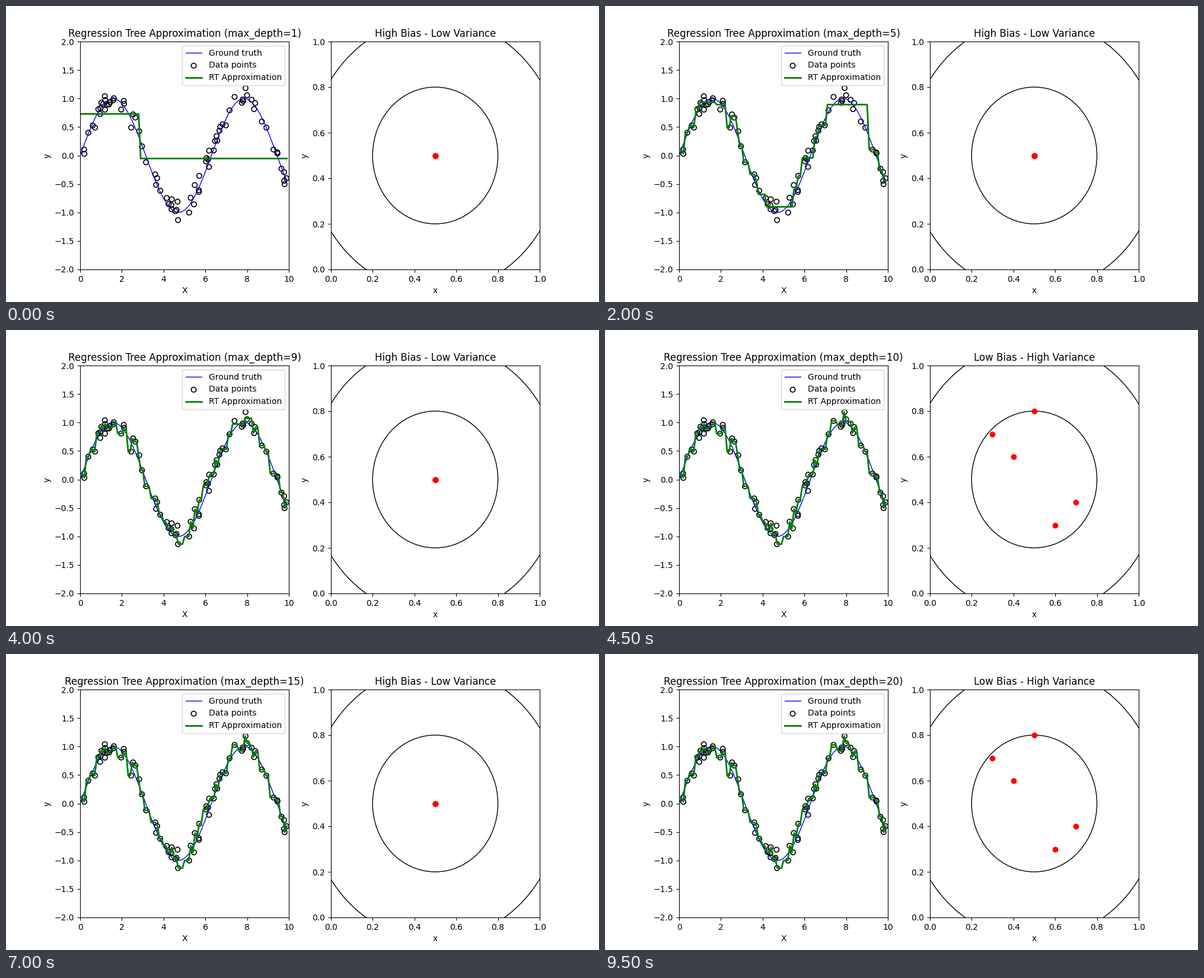
A matplotlib script that plays this animation: 1000 px wide and 500 px high, repeating every 10 s.

```python
import numpy as np
import matplotlib.pyplot as plt
from matplotlib.animation import FuncAnimation

MAX_DEPTH = 20
FRAME_MS = 500
CENTER = np.full((5, 2), 0.5)
SPREAD = np.array([(0.3, 0.7), (0.4, 0.6), (0.5, 0.8), (0.6, 0.3), (0.7, 0.4)])

np.random.seed(0)
X = np.sort(10 * np.random.rand(80))
y = np.sin(X) + np.random.normal(0, 0.1, X.size)
grid = np.arange(0, 10, 0.1)


def tree_predict(xs, ys, query, depth):
    """Greedy least-squares regression tree on sorted one-dimensional data."""
    n = len(ys)
    if depth == 0 or n < 2:
        return np.full(len(query), ys.mean())
    left_n = np.arange(1, n)
    left_sum = np.cumsum(ys)[:-1]
    right_sum = ys.sum() - left_sum
    gain = left_sum**2 / left_n + right_sum**2 / (n - left_n)
    k = np.argmax(gain) + 1
    left = query <= (xs[k - 1] + xs[k]) / 2
    out = np.empty(len(query))
    out[left] = tree_predict(xs[:k], ys[:k], query[left], depth - 1)
    out[~left] = tree_predict(xs[k:], ys[k:], query[~left], depth - 1)
    return out


fig, (ax_fit, ax_target) = plt.subplots(1, 2, figsize=(10, 5), dpi=100)

ax_fit.plot(grid, np.sin(grid), color="blue", linewidth=1, label="Ground truth")
ax_fit.scatter(X, y, facecolors="none", edgecolors="black", s=36,
               linewidths=1.2, label="Data points")
fit_line, = ax_fit.plot([], [], color="green", linewidth=2,
                        label="RT Approximation")
ax_fit.set(xlim=(0, 10), ylim=(-2, 2), xlabel="X", ylabel="y")
ax_fit.legend(loc="upper right")

for radius in (0.3, 0.6):
    ax_target.add_patch(plt.Circle((0.5, 0.5), radius, fill=False, color="black"))
dots = ax_target.scatter(*CENTER.T, color="red")
ax_target.set(xlim=(0, 1), ylim=(0, 1), xlabel="x", ylabel="y")


def update(i):
    depth = i + 1
    fit_line.set_data(grid, tree_predict(X, y, grid, depth))
    ax_fit.set_title(f"Regression Tree Approximation (max_depth={depth})")
    high_bias = depth % 2 == 1
    dots.set_offsets(CENTER if high_bias else SPREAD)
    ax_target.set_title("High Bias - Low Variance" if high_bias
                        else "Low Bias - High Variance")
    return fit_line, dots


anim = FuncAnimation(fig, update, frames=MAX_DEPTH, interval=FRAME_MS,
                     repeat=True, repeat_delay=0)
plt.show()
```
